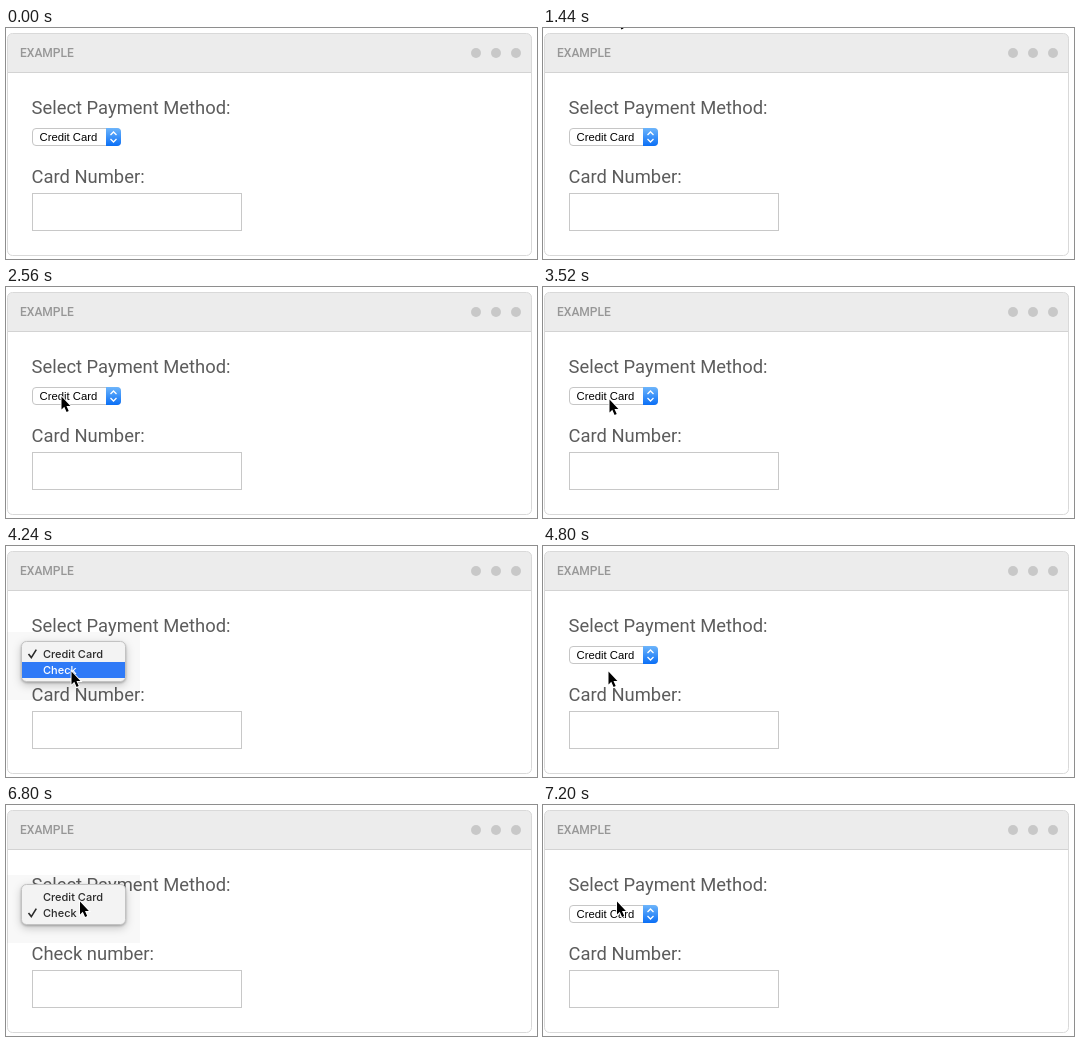
An HTML page that plays this animation: 531 px wide and 231 px high, repeating every 8000 ms.

```html
<!DOCTYPE html>
<html lang="en">
<head>
<meta charset="utf-8">
<title>Payment method example</title>
<style>
  html, body { margin: 0; width: 100%; height: 100%; overflow: hidden; background: #fff; }
  svg { display: block; }
  .label { font: 18.4px Roboto, sans-serif; fill: #5c5c5c; }
  .title { font: 500 12px Roboto, sans-serif; fill: #979797; }
  .value { font: 11.3px "Liberation Sans", Arial, sans-serif; fill: #000; }
  .item { font: 500 11px Inter, sans-serif; fill: #2a2a2a; }
  .item.on { fill: #fff; }
  .tick { fill: none; stroke: #2a2a2a; stroke-width: 1.6; }
  .tick.on { stroke: #fff; }
  .panel {
    fill: #f3f3f3; stroke: #c2c2c2;
    filter: drop-shadow(0 1px 1px rgba(0, 0, 0, .25)) drop-shadow(0 3px 4px rgba(0, 0, 0, .2));
  }
</style>
</head>
<body>
<svg width="531" height="231" viewBox="0 0 531 231">
  <defs>
    <linearGradient id="blue" x2="0" y2="1">
      <stop stop-color="#6db5fb"/>
      <stop offset="1" stop-color="#0a6ff6"/>
    </linearGradient>
  </defs>

  <path d="M1.5 44V11a5 5 0 0 1 5-5H521a5 5 0 0 1 5 5V44Z" fill="#ececec"/>
  <path d="M2 44.5H526" stroke="#d3d3d3"/>
  <rect x="1.5" y="5.5" width="524" height="222" rx="5" fill="none" stroke="#d9d9d9"/>
  <text class="title" x="14" y="29">EXAMPLE</text>
  <g fill="#c8c8c8">
    <circle cx="470" cy="25" r="5"/>
    <circle cx="490" cy="25" r="5"/>
    <circle cx="510" cy="25" r="5"/>
  </g>

  <text class="label" x="25.5" y="86">Select Payment Method:</text>
  <rect x="26.5" y="100.5" width="88" height="17" rx="3.5" fill="#fff" stroke="#c6c6c6"/>
  <path d="M100 100H111a4 4 0 0 1 4 4V114a4 4 0 0 1-4 4H100Z" fill="url(#blue)"/>
  <path d="M104.5 107l3-3 3 3M104.5 111l3 3 3-3" fill="none" stroke="#fff" stroke-width="1.3"/>
  <text class="value" id="value" x="33.5" y="113"></text>
  <text class="label" id="label" x="25.5" y="155"></text>
  <rect x="26.5" y="165.5" width="209" height="37" fill="#fff" stroke="#c8c8c8"/>

  <g id="menu">
    <rect x="1" y="-9" width="133" height="68" opacity=".027"/>
    <rect class="panel" x="15.5" y=".5" width="104" height="40" rx="5"/>
    <rect id="highlight" x="16" y="5" width="103" height="16" fill="#2f7af7"/>
    <path class="tick" id="tick" d="M22.5 13l2.8 3.6 5-8"/>
    <text class="item" x="37" y="17">Credit Card</text>
    <text class="item" x="37" y="33">Check</text>
  </g>

  <path id="cursor" d="M.5 .5V13.5L3.3 10.8 5.6 16 7.7 15.1 5.5 10H9.4Z" stroke="#fff" stroke-width="1.8" paint-order="stroke"/>
</svg>
<script>
  const LOOP = 8000, STEP = 80, ROW = 16;
  const METHODS = [
    { value: 'Credit Card', label: 'Card Number:' },
    { value: 'Check', label: 'Check number:' }
  ];
  const ENTRY = { x: 75, y: -30 };
  const MOVES = [
    { start: 1360, end: 2560, x: 55, y: 109 },
    { start: 3280, end: 3520, x: 66, y: 112 },
    { start: 4000, end: 4240, x: 65, y: 125 },
    { start: 5120, end: 5760, x: 81, y: 113.5 },
    { start: 6240, end: 6560, x: 73.5, y: 96 }
  ];
  const PICKS = [
    { open: 3680, click: 4560, before: 0 },
    { open: 6000, click: 6800, before: 1 }
  ];
  // Delays after the click
  const BLINK = 160, CLOSE = 240, CHANGE = 400;

  const [value, label, menu, highlight, tick, cursor] =
    ['value', 'label', 'menu', 'highlight', 'tick', 'cursor'].map(id => document.getElementById(id));
  const items = document.querySelectorAll('.item');

  const shift = (node, x, y) => node.setAttribute('transform', `translate(${x} ${y})`);
  const show = (node, visible) => node.setAttribute('visibility', visible ? 'visible' : 'hidden');
  const easeOut = k => 1 - (1 - k) ** 1.7;

  function pointerAt(t) {
    return MOVES.reduce((p, { start, end, x, y }) => {
      const k = easeOut(Math.min(1, Math.max(0, (t - start) / (end - start))));
      return { x: p.x + (x - p.x) * k, y: p.y + (y - p.y) * k };
    }, ENTRY);
  }

  function drawMenu(t, selected, pointerY) {
    const pick = PICKS.find(({ open, click }) => t >= open && t < click + CLOSE);
    menu.style.display = pick ? '' : 'none';
    if (!pick) return;

    // The selected row opens over the control.
    const top = 95 - ROW * selected;
    const hovered = pointerY < top + 5 + ROW ? 0 : 1;
    const lit = t < pick.click || t >= pick.click + BLINK;
    shift(menu, 0, top);
    shift(highlight, 0, ROW * hovered);
    show(highlight, lit);
    shift(tick, 0, ROW * selected);
    tick.classList.toggle('on', lit && hovered === selected);
    items.forEach((item, i) => item.classList.toggle('on', lit && i === hovered));
  }

  function draw(time) {
    const t = Math.floor(time % LOOP / STEP) * STEP;
    const pending = PICKS.find(({ click }) => t < click + CHANGE);
    const selected = pending ? pending.before : 0;
    const { x, y } = pointerAt(t);
    value.textContent = METHODS[selected].value;
    label.textContent = METHODS[selected].label;
    shift(cursor, x, y);
    drawMenu(t, selected, y);
  }

  const start = performance.now();
  function loop(now) {
    draw(Math.max(0, now - start));
    requestAnimationFrame(loop);
  }
  draw(0);
  requestAnimationFrame(loop);
</script>
</body>
</html>
```
